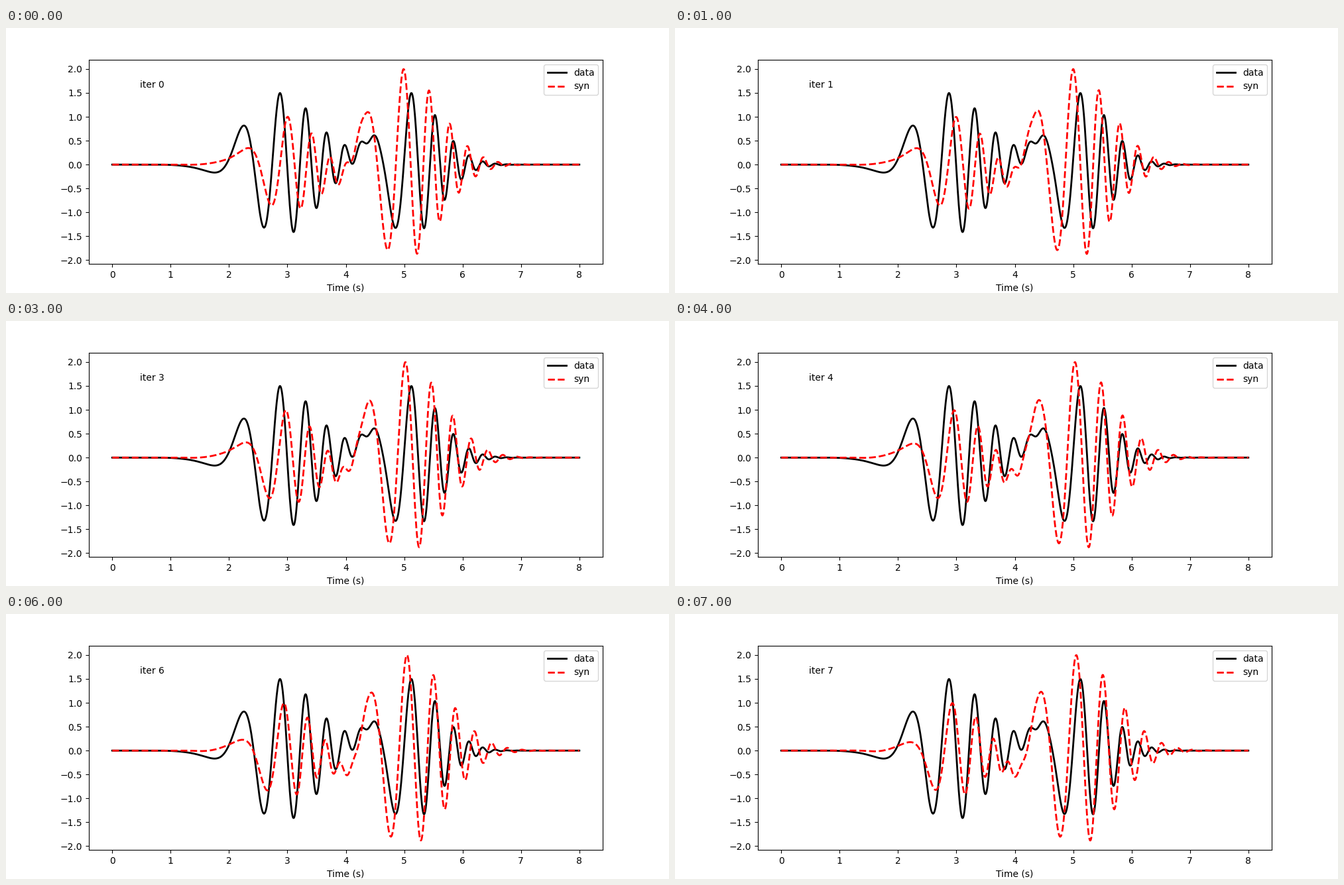
A matplotlib script that plays this animation: 1000 px wide and 400 px high, repeating every 8000 ms.

```python
import numpy as np
import matplotlib.pyplot as plt
from matplotlib.animation import FuncAnimation

FRAMES = 8
t = np.linspace(0, 8, 1001)


def chirp(amp, center, sigma, freq, sweep, shift):
    """Gaussian packet whose frequency rises linearly; phase in turns."""
    u = t - center
    phase = shift + freq * u + sweep * u**2
    return amp * np.exp(-u**2 / (2 * sigma**2)) * np.cos(2 * np.pi * phase)


def mix(a, b, s):
    return a + (b - a) * s


def synthetic(i):
    s = i / (FRAMES - 1)
    fast = 1 - (1 - s)**1.2
    slow = s**2
    first = chirp(1, mix(3.0, 2.94, fast), mix(0.5, 0.483, slow),
                  mix(2.0, 2.02, slow), mix(0.98, 1.15, slow),
                  mix(-0.012, 0.018, slow))
    second = chirp(2, mix(5.0, 5.07, fast), mix(0.6, 0.645, fast),
                   mix(1.99, 1.95, fast), mix(0.685, 0.542, fast),
                   mix(0.02, 0.033, fast))
    return first + second


data = (chirp(1.5, 2.9, 0.6, 2, 0.66, 0.054)
        + chirp(1.5, 5.1, 0.5, 2, 0.99, -0.048))

fig, ax = plt.subplots(figsize=(10, 4), dpi=100)
ax.plot(t, data, "k", lw=2, label="data")
syn_line, = ax.plot(t, synthetic(0), "r--", lw=2, label="syn")
label = ax.text(0.1, 0.9, "iter 0", transform=ax.transAxes, va="top")
ax.set_xlim(-0.4, 8.4)
ax.set_ylim(-2.077, 2.193)
ax.set_xlabel("Time (s)")
ax.legend(loc="upper right")


def update(i):
    syn_line.set_ydata(synthetic(i))
    label.set_text(f"iter {i}")
    return syn_line, label


anim = FuncAnimation(fig, update, frames=FRAMES, interval=1000,
                     repeat=True, repeat_delay=0)
plt.show()
```
